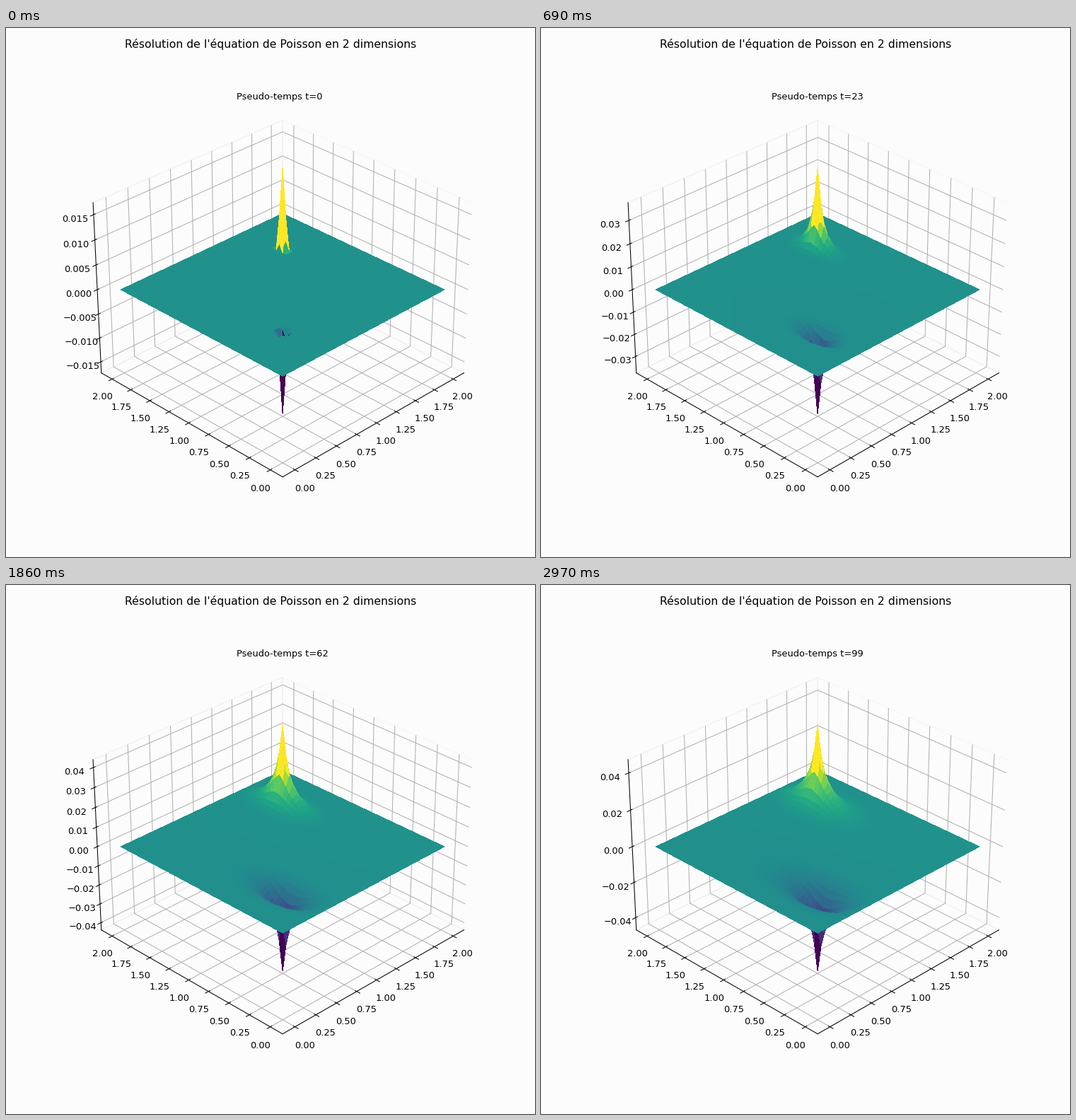
These frames come from a looping animation (748x748 px, 3 s). A matplotlib script:

```python
import numpy as np
import matplotlib.pyplot as plt
from matplotlib.animation import FuncAnimation
from matplotlib.ticker import MaxNLocator

N = 50
STEPS = 100
INTERVAL = 30
BACK = "#fcfcfc"
MARGIN = 1 / 48

dx, dy = 2 / (N - 1), 1 / (N - 1)
axis = np.linspace(0, 2, N)
X, Y = np.meshgrid(axis, axis)

# One positive and one negative point source
b = np.zeros((N, N))
b[N // 4, N // 4] = 100
b[3 * N // 4, 3 * N // 4] = -100


def relax(p):
    """One Jacobi sweep with zero values kept on the border."""
    q = np.zeros_like(p)
    q[1:-1, 1:-1] = (
        (p[1:-1, 2:] + p[1:-1, :-2]) * dy**2
        + (p[2:, 1:-1] + p[:-2, 1:-1]) * dx**2
        - b[1:-1, 1:-1] * dx**2 * dy**2
    ) / (2 * (dx**2 + dy**2))
    return q


def solve():
    p = relax(np.zeros((N, N)))
    fields = []
    for _ in range(STEPS):
        p = relax(p)
        fields.append(p)
    return fields


def quads(z):
    """Cell corners of the surface, one row of four points per cell."""
    pts = np.stack([X, Y, z], axis=-1)
    corners = [pts[:-1, :-1], pts[:-1, 1:], pts[1:, 1:], pts[1:, :-1]]
    return np.stack(corners, axis=2).reshape(-1, 4, 3)


fields = solve()

fig = plt.figure(figsize=(8, 8), dpi=93.5, facecolor=BACK)
fig.suptitle("Résolution de l'équation de Poisson en 2 dimensions")
ax = fig.add_subplot(projection="3d", facecolor=BACK)
ax.view_init(30, 225)
for side in (ax.xaxis, ax.yaxis, ax.zaxis):
    side.pane.set_facecolor("none")

surface = ax.plot_surface(X, Y, fields[0], rstride=1, cstride=1,
                          cmap="viridis", linewidth=0, antialiased=False)
ax.set_xlim(-0.1, 2.1, view_margin=MARGIN)
ax.set_ylim(-0.1, 2.1, view_margin=MARGIN)
label = ax.text2D(0.4, 0.98, "", transform=ax.transAxes)
locator = MaxNLocator(9, steps=[1, 2, 2.5, 5, 10])


def update(t):
    z = fields[t]
    verts = quads(z)
    mean = verts[:, :, 2].mean(axis=1)
    surface.set_verts(verts)
    surface.set_array(mean)
    surface.set_clim(mean.min(), mean.max())

    low, high = z.min(), z.max()
    ticks = locator.tick_values(low, high)
    ax.set_zticks(ticks[(ticks >= low) & (ticks <= high)])
    ax.set_zlim(low, high, view_margin=MARGIN)
    label.set_text(f"Pseudo-temps t={t}")
    return surface, label


anim = FuncAnimation(fig, update, frames=STEPS, interval=INTERVAL,
                     repeat=True, repeat_delay=0, blit=False)
plt.show()
```
